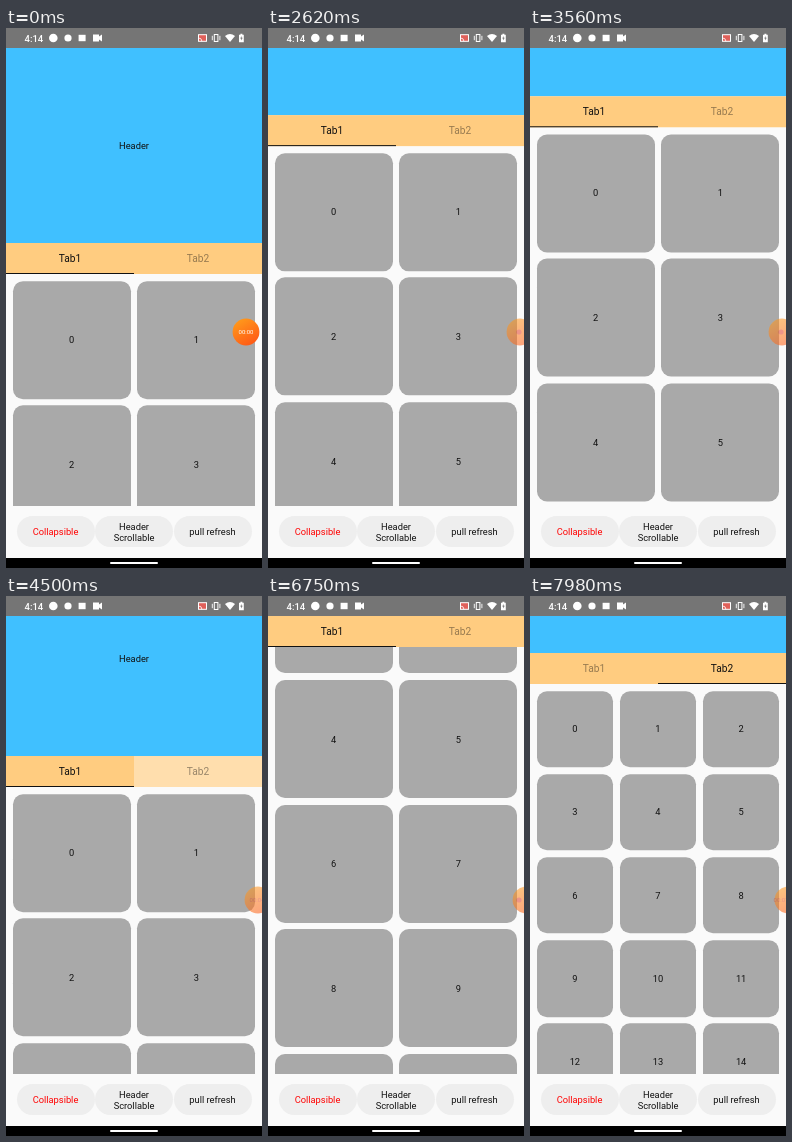
An HTML page that plays this animation: 256 by 540 pixels, repeating every 8 s.

```html
<!DOCTYPE html>
<html lang="en">
<head>
<meta charset="utf-8">
<title>Collapsible tabs</title>
<style>
  html, body { margin: 0; width: 100%; height: 100%; overflow: hidden; background: #fafafa; }
  body { position: relative; font: 9.3px/11px Roboto, sans-serif; color: #111; }
  div, svg { position: absolute; box-sizing: border-box; }
  #stage { left: 0; top: 0; width: 256px; height: 540px; overflow: hidden; background: #fafafa; }
  #view { left: 0; top: 20px; width: 256px; height: 458px; overflow: hidden; }
  #pages { left: 0; top: 0; width: 512px; height: 100%; }
  .page { top: 0; width: 256px; height: 100%; overflow: hidden; }
  .tile { background: #a9a9a9; border-radius: 10px; display: flex; align-items: center; justify-content: center; }
  #top { left: 0; top: 0; width: 256px; height: 226.2px; }
  #header { width: 256px; height: 195px; background: #40c0ff; text-align: center; line-height: 196px; }
  #tabs { top: 195px; width: 256px; height: 31.2px; background: #ffcc80; }
  .tab { width: 128px; height: 31.2px; font-size: 10.2px; line-height: 32px; text-align: center; }
  #ripple { left: 128px; width: 128px; height: 31.2px; background: #fff; opacity: 0; }
  #line { bottom: 0; width: 128px; height: 1.3px; background: #111; }
  .pill { top: 488px; width: 78px; height: 31px; border-radius: 16px; background: #eee;
    display: flex; align-items: center; justify-content: center; text-align: center; }
  #bar { left: 0; top: 0; }
  #nav { left: 0; top: 529.5px; width: 256px; height: 10.5px; background: #000; }
  #nav div { left: 104px; top: 4.3px; width: 48px; height: 2px; border-radius: 1px; background: #fff; }
  #rec { left: 0; top: 290px; }
</style>
</head>
<body>
<div id="stage">
  <div id="view">
    <div id="pages"></div>
    <div id="top">
      <div id="header">Header</div>
      <div id="tabs">
        <div id="ripple"></div>
        <div class="tab" style="left:0">Tab1</div>
        <div class="tab" style="left:128px">Tab2</div>
        <div id="line"></div>
      </div>
    </div>
  </div>
  <div class="pill" style="left:10.5px;color:#f00">Collapsible</div>
  <div class="pill" style="left:89px">Header<br>Scrollable</div>
  <div class="pill" style="left:167.5px">pull refresh</div>
  <svg id="bar" width="256" height="20" fill="#fff">
    <rect width="256" height="20" fill="#757575"/>
    <text x="18.5" y="13.6" font-size="9.5" font-weight="500">4:14</text>
    <circle cx="47.3" cy="10" r="4.3"/>
    <circle cx="62" cy="10" r="3.6"/>
    <rect x="72.6" y="6.8" width="7" height="6.4"/>
    <path d="M87 6.5h6v2l3-2v7l-3-2v2h-6z"/>
    <g fill="none" stroke="#fff">
      <rect x="192.5" y="6.7" width="8" height="6.6" fill="#e0605a"/>
      <path d="M192.5 10a3.4 3.4 0 0 1 3.4 3.4" stroke-width=".8"/>
      <rect x="208.3" y="6.5" width="3.6" height="7"/>
      <path d="M206.3 7.8v4.4M213.9 7.8v4.4" stroke-width=".9"/>
    </g>
    <path d="M219 8q5-4 10 0l-5 6z"/>
    <path d="M233 6.8h1.4v-1h2v1h1.4v7.4h-4.8z"/>
    <path d="M235.6 8l-1.4 2.6h1v2l1.5-2.8h-1.1z" fill="#757575"/>
  </svg>
  <div id="nav"><div></div></div>
  <svg id="rec" width="28" height="28" overflow="visible">
    <defs>
      <linearGradient id="glow" x1="0" y1="0" x2=".6" y2="1">
        <stop stop-color="#ffa21c"/><stop offset="1" stop-color="#ff5c16"/>
      </linearGradient>
    </defs>
    <circle id="disc" cy="14" r="13.4" fill="url(#glow)"/>
    <circle id="dot" cy="14" r="2.6" fill="#e4432c"/>
    <text id="clock" y="16.2" font-size="6" text-anchor="middle"></text>
  </svg>
</div>
<script>
const LOOP = 8000, HEADER = 195, TABS = 31.2, GAP = 6.6;
const $ = id => document.getElementById(id);

// [time, value] tables
const SCROLL = [[2270, 0], [2400, 24], [2620, 127.4], [2850, 235], [3060, 268], [3220, 258],
  [3560, 147], [3850, 75], [4090, 55], [6040, 55], [6200, 95], [6500, 290], [6750, 418],
  [6880, 438], [7000, 420], [7220, 250], [7440, 158]];
const PAGE = [[4550, 0], [4610, .4], [4670, .83], [4730, 1], [5730, 1], [5800, .78],
  [5860, .41], [5920, .16], [6010, 0], [7560, 0], [7650, .3], [7740, .78], [7860, 1]];
const RIPPLE = [[4350, 0], [4440, .35], [4560, .35], [4720, 0]];
const DOCK = [[490, 240], [710, 252], [4930, 252], [5240, 258]];
const FADE = [[1230, 1], [1740, .55]];
const CLOCK_SPANS = [[0, 1240], [4370, 4940], [7440, 8000]];

// Monotone cubic through the table points
function at(pts, t) {
  const last = pts.length - 1;
  if (t <= pts[0][0]) return pts[0][1];
  if (t >= pts[last][0]) return pts[last][1];
  const i = pts.findIndex(p => p[0] > t) - 1;
  const rate = k => (pts[k + 1][1] - pts[k][1]) / (pts[k + 1][0] - pts[k][0]);
  const slope = k => {
    if (k <= 0 || k >= last) return 0;
    const a = rate(k - 1), b = rate(k);
    return a * b <= 0 ? 0 : 2 * a * b / (a + b);
  };
  const [x, y] = pts[i], [x2, y2] = pts[i + 1];
  const h = x2 - x, u = (t - x) / h, v = 1 - u;
  return v * v * (1 + 2 * u) * y + u * u * (3 - 2 * u) * y2
    + h * u * v * (v * slope(i) - u * slope(i + 1));
}

function grid(cols, left) {
  const page = document.createElement('div'), list = document.createElement('div');
  page.className = 'page';
  page.style.left = left + 'px';
  const size = (256 - GAP * (cols + 1)) / cols, pitch = size + GAP;
  for (let n = 0; n < 24; n++) {
    const tile = document.createElement('div');
    tile.className = 'tile';
    tile.textContent = n;
    tile.style.cssText = `left:${GAP + n % cols * pitch}px;top:${GAP + Math.floor(n / cols) * pitch}px;` +
      `width:${size}px;height:${size}px`;
    list.append(tile);
  }
  page.append(list);
  $('pages').append(page);
  return list;
}

const lists = [grid(2, 0), grid(3, 256)];
const labels = document.querySelectorAll('.tab');
const move = (el, x, y) => el.style.transform = `translate(${x}px,${y}px)`;

function draw(t) {
  const scroll = at(SCROLL, t), fold = Math.min(scroll, HEADER), page = at(PAGE, t);
  const base = HEADER + TABS - fold;
  move($('top'), 0, -fold);
  move($('pages'), -256 * page, 0);
  move(lists[0], 0, base - (scroll - fold));
  move(lists[1], 0, base);
  move($('line'), 128 * at(PAGE, t - 7), 0);
  [1 - page, page].forEach((a, i) => labels[i].style.opacity = .43 + .57 * a * a);
  $('ripple').style.opacity = at(RIPPLE, t);

  const x = at(DOCK, t), alpha = at(FADE, t), inner = Math.min(x, 251);
  const timed = CLOCK_SPANS.some(([a, b]) => t >= a && t < b);
  $('rec').style.opacity = alpha;
  $('disc').setAttribute('cx', x);
  $('dot').setAttribute('cx', inner);
  $('dot').style.display = timed ? 'none' : '';
  $('clock').setAttribute('x', inner);
  $('clock').setAttribute('fill', alpha > .9 ? '#fff' : '#d8432c');
  $('clock').textContent = timed ? '00:0' + Math.floor(t / 1000) : '';
}

const start = performance.now();
function tick() {
  draw((performance.now() - start) % LOOP);
  requestAnimationFrame(tick);
}
tick();
</script>
</body>
</html>
```
